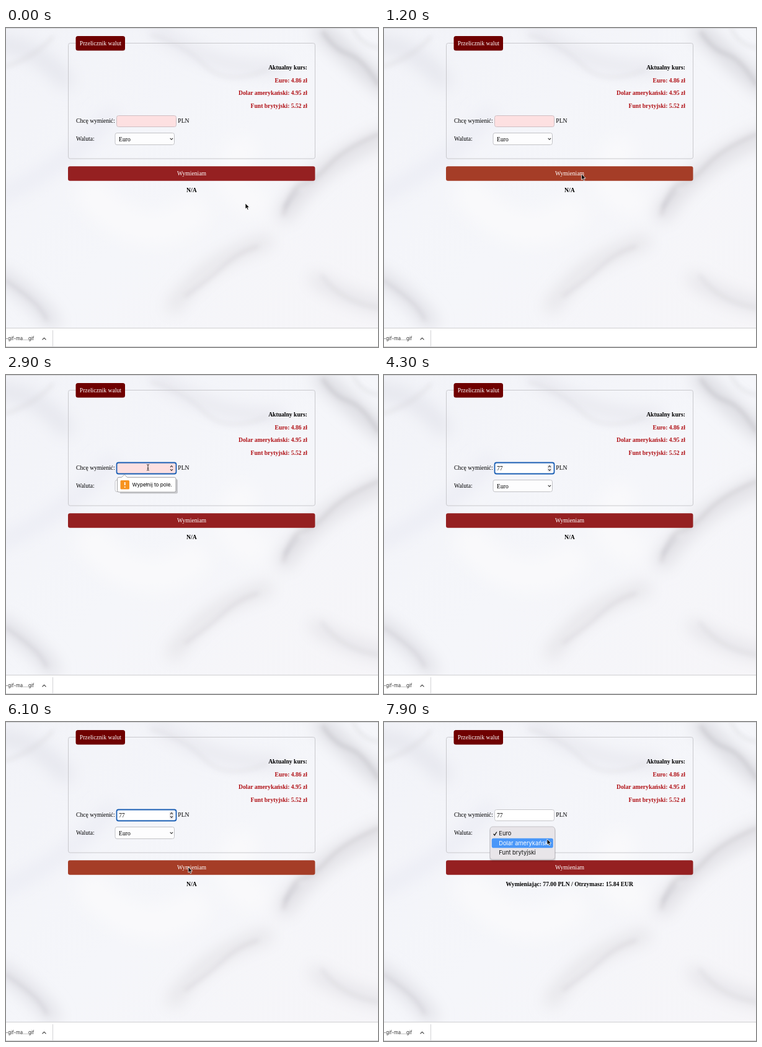
Write an HTML page that moves like this. It is 600 px wide and 515 px high and loops after 8000 ms.

```html
<!DOCTYPE html>
<html lang="pl">
<head>
<meta charset="utf-8">
<title>Przelicznik walut</title>
<style>
html, body { margin: 0; width: 100%; height: 100%; overflow: hidden; background: #f4f5f9; }
svg { position: absolute; left: 0; top: 0; width: 600px; height: 515px; }
text { font: 9.65px "Liberation Serif", "Times New Roman", serif; fill: #000; white-space: pre; }
.b { font-weight: 700; }
.red { fill: #b01116; }
.white { fill: #fff; }
.end { text-anchor: end; }
.mid { text-anchor: middle; }
.ui { font-family: Inter, Roboto, sans-serif; font-size: 9.3px; }
</style>
</head>
<body>
<svg viewBox="0 0 600 515" id="marble">
  <defs>
    <linearGradient id="base" x1="0" y1="0" x2="1" y2="1">
      <stop offset="0" stop-color="#f2f3f8"/>
      <stop offset=".5" stop-color="#f5f6fa"/>
      <stop offset="1" stop-color="#f6f5f8"/>
    </linearGradient>
    <filter id="soft" x="-50" y="-50" width="700" height="615" filterUnits="userSpaceOnUse"><feGaussianBlur stdDeviation="13"/></filter>
    <filter id="fine" x="-50" y="-50" width="700" height="615" filterUnits="userSpaceOnUse"><feGaussianBlur stdDeviation="3.5"/></filter>
  </defs>
  <rect width="600" height="515" fill="url(#base)"/>
  <g id="clouds" filter="url(#soft)" fill="none" stroke-linecap="round"></g>
  <g id="veins" filter="url(#fine)" fill="none" stroke="#bdbbc1" stroke-linecap="round"></g>
</svg>
<svg viewBox="0 0 600 515">
  <rect width="600" height="1" fill="#d3d3d6"/>

  <rect x="100.5" y="24.5" width="398" height="186.5" rx="3" fill="none" stroke="#c9c9cd"/>
  <rect x="112.5" y="13" width="79.5" height="23.5" rx="3.5" fill="#6f0000"/>
  <text class="white" x="118.8" y="28">Przelicznik walut</text>

  <text class="b end" x="486" y="66.7">Aktualny kurs:</text>
  <text class="b red end" x="486" y="87.5">Euro: 4.86 zł</text>
  <text class="b red end" x="486" y="108">Dolar amerykański: 4.95 zł</text>
  <text class="b red end" x="486" y="129">Funt brytyjski: 5.52 zł</text>

  <text x="113" y="153.3">Chcę wymienić:</text>
  <rect id="field" x="178.5" y="141.5" width="96" height="18" rx="3"/>
  <text id="amount" x="182" y="153.5"></text>
  <rect id="caret" y="145.5" width=".8" height="10.5"/>
  <g id="spin">
    <rect id="spinBack" x="263.5" y="144.5" width="7" height="12" rx="2" fill="#e9e8ea"/>
    <path d="M265 148.8l2-2.3 2 2.3M265 152l2 2.3 2-2.3" fill="none" stroke="#333" stroke-width="1.1"/>
  </g>
  <text x="277.3" y="153.3">PLN</text>

  <text x="113" y="182.3">Waluta:</text>
  <rect x="176" y="169.5" width="95.5" height="19" rx="3" fill="#fdfdfe" stroke="#c2c2c6"/>
  <text x="182" y="182.6">Euro</text>
  <path d="M264.7 177.9l2.2 2.4 2.2-2.4" fill="none" stroke="#333" stroke-width="1.1"/>

  <rect id="button" x="100" y="223.3" width="398.5" height="23.4" rx="3.2"/>
  <text class="white mid" x="299.5" y="238">Wymieniam</text>
  <text class="b mid" id="result" x="299.3" y="264.8"></text>

  <g id="tip">
    <path d="M184 168H274.5a2.5 2.5 0 0 1 2.5 2.5V189a2.5 2.5 0 0 1-2.5 2.5H184z" fill="#777" opacity=".35"/>
    <path d="M182 165.3H186.5L191 160.7 195.5 165.3H271.5a2.5 2.5 0 0 1 2.5 2.5V186.5a2.5 2.5 0 0 1-2.5 2.5H182a2.5 2.5 0 0 1-2.5-2.5V167.8a2.5 2.5 0 0 1 2.5-2.5z" fill="#fff" stroke="#9a9a9e" stroke-width=".9"/>
    <rect x="184.5" y="170" width="14.5" height="14.5" rx="1.5" fill="#f7931e"/>
    <path d="M191.7 173v5M191.7 180v1.8" stroke="#fff" stroke-width="1.7"/>
    <text class="ui" x="203.4" y="180.2" style="font-size:8.2px">Wypełnij to pole.</text>
  </g>

  <g id="menu">
    <rect x="170" y="171" width="107" height="55" rx="5" fill="#000" opacity=".07"/>
    <rect x="170.5" y="170" width="106" height="54" rx="5" fill="#000" opacity=".09"/>
    <rect x="171" y="169" width="104.7" height="53" rx="4.5" fill="#e8e5e9" stroke="#b9b6bb" stroke-width=".8"/>
    <rect id="mark" x="173.8" width="99" height="15.4" rx="2.8" fill="#4a97f8"/>
    <path id="check" d="M176.6 180.6l1.8 2.3 3.4-5.4" fill="none" stroke-width="1.2"/>
    <g id="items"></g>
  </g>

  <rect y="484" width="600" height="31" fill="#fff"/>
  <path d="M0 484.5H600M0 514.5H600" stroke="#cfcfd1"/>
  <path d="M75.5 488V515" stroke="#d3d3d5"/>
  <text class="ui end" x="45.3" y="504.3" style="font-size:7.7px;fill:#333">-gif-ma....gif</text>
  <path d="M58.5 503.3l3-3 3 3" fill="none" stroke="#444" stroke-width="1.2"/>

  <path id="arrow" d="M0 0V9.2L2.1 7.3 3.5 10.6 5.2 9.9 3.8 6.7H6.7z" fill="#000" stroke="#fff" stroke-width=".8"/>
  <path id="beam" d="M-2-4.5Q0-4.5 0-3Q0-4.5 2-4.5M0-3V3.5M-2 5Q0 5 0 3.5Q0 5 2 5M-1.2 1.5H1.2" fill="none" stroke="#222" stroke-width=".9"/>
</svg>
<script>
const LOOP = 8000, STEP = 100;
const NS = "http://www.w3.org/2000/svg";
const $ = id => document.getElementById(id);

function add(parent, tag, attrs) {
  const el = document.createElementNS(NS, tag);
  for (const k in attrs) el.setAttribute(k, attrs[k]);
  return $(parent).appendChild(el);
}

// Marble: wide pale clouds with thinner veins over them
[
  ["M510 5Q545 40 610 95", 24, "#d9d9df"],
  ["M610 175Q500 220 450 300", 24, "#dfdee3"],
  ["M420 345Q320 375 270 450", 20, "#e3e2e6"],
  ["M-10 400Q40 430 75 475", 22, "#dedee4"],
  ["M-10 25Q50 30 95 85", 26, "#e5e6ed"],
  ["M240 0Q330 70 440 65", 18, "#e5e5ec"],
  ["M500 405Q550 440 610 450", 20, "#e3e2e7"],
  ["M-10 270Q90 230 170 140", 22, "#ebecf4"],
  ["M140 270Q220 360 300 300", 55, "#f9f9fb"],
  ["M380 200Q340 260 400 280", 50, "#f9f9fb"]
].forEach(([d, w, c]) => add("clouds", "path", { d, "stroke-width": w, stroke: c }));
[
  ["M512 8Q530 35 552 42T600 90", 7, .45],
  ["M560 0Q570 25 600 32", 5, .25],
  ["M600 172Q545 195 520 222T478 252 448 300", 6, .38],
  ["M470 265L450 288", 9, .25],
  ["M405 353Q375 362 350 385T290 432", 5, .28],
  ["M0 408Q25 425 42 440T65 470", 6, .32],
  ["M0 62Q45 48 75 15", 5, .22],
  ["M235 12Q285 25 320 60T420 68", 4, .2],
  ["M510 400Q540 442 600 452", 4, .25]
].forEach(([d, w, o]) => add("veins", "path", { d, "stroke-width": w, opacity: o }));

const items = ["Euro", "Dolar amerykański", "Funt brytyjski"].map((name, i) => {
  const el = add("items", "text", { class: "ui", x: 185.3, y: 183 + i * 15.6 });
  el.textContent = name;
  return el;
});

// Pointer stops: time, x, y
const stops = [
  [0, 386, 283], [900, 318.5, 235.8], [2000, 318.5, 235.8], [2700, 229, 149],
  [4700, 229, 149], [5600, 287, 219.5], [6000, 294, 234], [6600, 294, 234],
  [7000, 285.5, 220.5], [7400, 255, 178], [7600, 255, 178], [7900, 263, 189]
];

function pointer(t) {
  const i = stops.findIndex(s => s[0] > t);
  if (i < 0) return stops[stops.length - 1].slice(1);
  const [t0, x0, y0] = stops[i - 1], [t1, x1, y1] = stops[i];
  const p = (t - t0) / (t1 - t0);
  // the pass over the button edge keeps its speed
  const e = t0 >= 4700 ? p : p * p * (3 - 2 * p);
  return [x0 + (x1 - x0) * e, y0 + (y1 - y0) * e];
}

const within = (t, a, b) => t >= a && t < b;
const show = (id, on) => { $(id).style.display = on ? "" : "none"; };
const set = (id, attrs) => { for (const k in attrs) $(id).setAttribute(k, attrs[k]); };

function draw(t) {
  const [x, y] = pointer(t);
  const typed = t < 3300 ? "" : t < 3700 ? "7" : "77";
  const focus = within(t, 1400, 6200);
  const overField = within(t, 2400, 5100) && y < 159;
  const hidden = within(t, 3300, 4700);
  const hover = within(t, 600, 2200) || within(t, 5700, 7100);
  const done = t >= 6200;

  set("field", {
    fill: typed ? "#fff" : "#fde0e1",
    stroke: focus ? "#1b5fb4" : typed ? "#c6c6ca" : "#cfbfc3",
    "stroke-width": focus ? 1.8 : 1
  });
  $("amount").textContent = typed;
  set("caret", { x: 182.2 + typed.length * 4.83 });
  const blink = t < 4100 || Math.floor((t - 4500) / 500) % 2 === 0;
  show("caret", focus && typed && blink);
  show("spin", focus);
  show("spinBack", typed);

  show("tip", within(t, 1400, 3400));
  $("tip").style.opacity = t === 1400 || t === 3300 ? .5 : 1;

  set("button", { fill: hover ? "#a53d27" : "#952021" });
  $("result").textContent = done ? "Wymieniając: 77.00 PLN / Otrzymasz: 15.84 EUR" : "N/A";

  show("menu", t >= 7600);
  const pick = y > 187 ? 1 : 0;
  set("mark", { y: 172.2 + pick * 15.6 });
  set("check", { stroke: pick ? "#111" : "#fff" });
  items.forEach((el, i) => { el.style.fill = i === pick ? "#fff" : "#111"; });

  const at = `translate(${x.toFixed(2)} ${y.toFixed(2)})`;
  set("arrow", { transform: at });
  set("beam", { transform: at });
  show("arrow", !overField && !hidden);
  show("beam", overField && !hidden);
}

const start = performance.now();
function frame(now) {
  const t = Math.max(0, now - start) % LOOP;
  draw(Math.floor(t / STEP) * STEP);
  requestAnimationFrame(frame);
}
draw(0);
requestAnimationFrame(frame);
</script>
</body>
</html>
```
